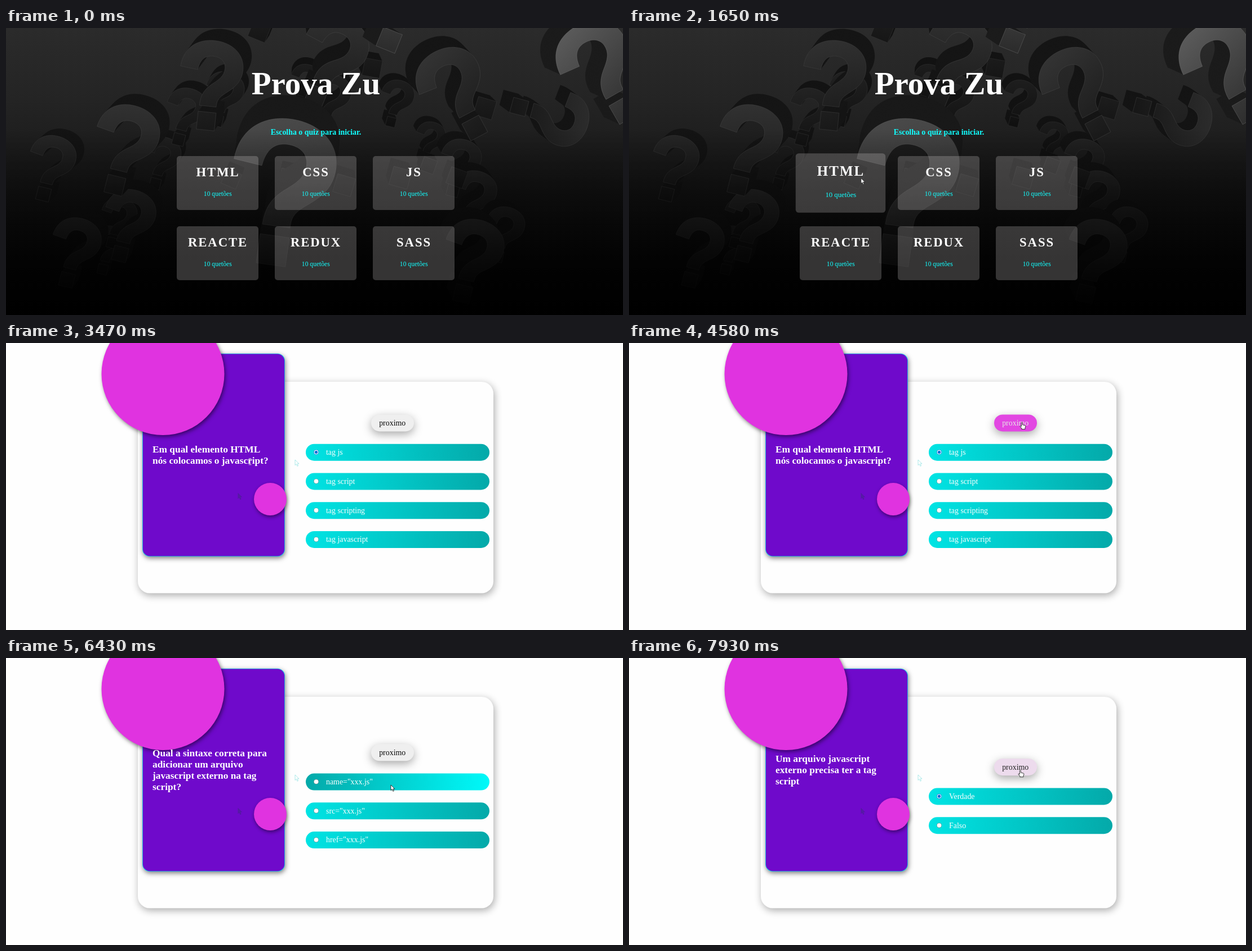
An HTML page with a canvas that plays this animation: 1095 px wide and 511 px high, repeating every 8000 ms.

```html
<!DOCTYPE html>
<html lang="pt">
<head>
<meta charset="utf-8">
<title>Quiz</title>
<style>
  html, body { margin: 0; width: 100%; height: 100%; overflow: hidden; background: #000; }
  canvas { display: block; }
</style>
</head>
<body>
<canvas id="stage" width="1095" height="511"></canvas>
<script>
const W = 1095, H = 511, LOOP = 8000, FADE = 300;
const ctx = document.getElementById('stage').getContext('2d');
const SERIF = '"Liberation Serif", "Times New Roman", serif';
const PINK = '#e033e0';
const QUIZ_START = 1710;

// start: the question appears, picked: its first answer is chosen
const questions = [
  { start: QUIZ_START, picked: 2850, lines: ['Em qual elemento HTML', 'nós colocamos o javascript?'],
    options: ['tag js', 'tag script', 'tag scripting', 'tag javascript'] },
  { start: 5040, picked: 5640, lines: ['Onde é o local certo de', 'colocar o javascript?'],
    options: ['Na tag body', 'Na tag head', 'Tanto na tag body quanto a head estão corretas'] },
  { start: 6000, picked: 6640, lines: ['Qual a sintaxe correta para', 'adicionar um arquivo', 'javascript externo na tag', 'script?'],
    options: ['name="xxx.js"', 'src="xxx.js"', 'href="xxx.js"'] },
  { start: 7120, picked: 7650, lines: ['Um arquivo javascript', 'externo precisa ter a tag', 'script'],
    options: ['Verdade', 'Falso'] },
];
const cards = ['HTML', 'CSS', 'JS', 'REACTE', 'REDUX', 'SASS'].map((name, i) =>
  ({ name, x: 303 + i % 3 * 174, y: i < 3 ? 228 : 353, w: 145, h: 96 }));

// ---- layout ----
const questionAt = t => questions.findLast(q => t >= q.start);
const optionBox = (q, i) => ({ x: 532, y: 179.7 + 25.9 * (4 - q.options.length) + 51.75 * i, w: 326, h: 30 });
const buttonBox = q => ({ x: 648, y: optionBox(q, 0).y - 52.3, w: 76, h: 30 });
const textBox = { x: 260, y: 180, w: 206, h: 40 };
const inside = (p, r) => p.x >= r.x && p.x < r.x + r.w && p.y >= r.y && p.y < r.y + r.h;

// ---- pointer: eased, slightly bowed moves between spots inside boxes ----
const spot = (r, fx, fy) => ({ x: r.x + r.w * fx, y: r.y + r.h * fy });
const answer = (n, fx, fy) => spot(optionBox(questions[n], 0), fx, fy);
const button = (n, fx = 0.5, fy = 0.6) => spot(buttonBox(questions[n]), fx, fy);
const smooth = k => k * k * (3 - 2 * k);

const moves = [
  { from: 90, to: 850, goal: spot(cards[1], 0.6, 0.6) },
  { from: 920, to: 1390, goal: spot(cards[0], 0.75, 0.41) },
  { from: 1970, to: 2380, goal: answer(0, 0.166, 0.4) },
  { from: 2520, to: 2800, goal: answer(0, 0.06, 0.45) },
  { from: 2950, to: 3260, goal: spot(textBox, 0.975, 0.78) },
  { from: 3330, to: 3470, goal: spot(textBox, 0.84, 0.78) },
  { from: 3730, to: 4580, goal: button(0, 0.65, 0.45) },
  { from: 5180, to: 5500, goal: answer(1, 0.44, 0.25) },
  { from: 5720, to: 5900, goal: button(1) },
  { from: 6010, to: 6300, goal: answer(2, 0.463, 0.68) },
  { from: 6700, to: 6950, goal: button(2) },
  { from: 7390, to: 7600, goal: answer(3, 0.485, 0.5) },
  { from: 7770, to: 7930, goal: button(3, 0.61, 0.67) },
];

function pointerAt(t) {
  const i = moves.findLastIndex(move => t >= move.from);
  if (i < 0) return { x: -99, y: -99 };
  const { from, to, goal } = moves[i];
  const origin = i ? moves[i - 1].goal : { x: 1060, y: 500 };
  const k = smooth(Math.min(1, (t - from) / (to - from)));
  const dx = goal.x - origin.x, dy = goal.y - origin.y;
  const bow = 0.09 * Math.hypot(dx, dy) * Math.sin(Math.PI * k);
  return { x: origin.x + dx * k, y: origin.y + dy * k - bow };
}

const overButton = t => t >= QUIZ_START && inside(pointerAt(t), buttonBox(questionAt(t)));

// share of the last FADE ms spent hovering, eased
function hoverAmount(isOver, t) {
  const samples = 30;
  let hits = 0;
  for (let i = 0; i < samples; i++) if (isOver(t - i * FADE / samples)) hits++;
  return smooth(hits / samples);
}

// ---- drawing helpers ----
const gray = (v, a = 1) => `rgba(${v},${v},${v},${a})`;

function text(str, x, y, size, color, { bold = false, align = 'left', spacing = 0 } = {}) {
  ctx.font = `${bold ? 'bold ' : ''}${size}px ${SERIF}`;
  ctx.textAlign = align;
  ctx.letterSpacing = spacing + 'px';
  ctx.fillStyle = color;
  ctx.fillText(str, x, y);
}

function shape(build, fill, shadow) {
  ctx.save();
  if (shadow) {
    [ctx.shadowOffsetX, ctx.shadowOffsetY, ctx.shadowBlur] = shadow;
    ctx.shadowColor = gray(0, shadow[3]);
  }
  ctx.beginPath();
  build();
  ctx.fillStyle = fill;
  ctx.fill();
  ctx.restore();
}
const box = ({ x, y, w, h }, r, fill, shadow) => shape(() => ctx.roundRect(x, y, w, h, r), fill, shadow);
const disc = (x, y, r, fill, shadow) => shape(() => ctx.arc(x, y, r, 0, 7), fill, shadow);

function gradient(c, x0, y0, x1, y1, ...colors) {
  const g = c.createLinearGradient(x0, y0, x1, y1);
  colors.forEach((color, i) => g.addColorStop(i / (colors.length - 1), color));
  return g;
}

// ---- dark backdrop of solid question marks ----
const MARK = new Path2D('M0 48C2 15 25 0 52 0C82 0 104 18 104 44C104 68 88 78 76 88C68 95 66 100 66 110L38 110' +
  'C38 92 44 82 56 72C66 64 74 57 74 45C74 33 65 26 52 26C39 26 31 34 29 51ZM37 120h30v30h-30z');
const CUBE = new Path2D('M27 50h50v50h-50z');

// sides recede towards a point above the stage; the light comes from the top right
function solid(c, path, x, y, size, tilt = 14) {
  const toX = 550 - x, toY = -150 - y, depth = size * 0.16, far = Math.hypot(toX, toY);
  const glow = 250 * (x / W - 2 * y / H - 0.5);
  const light = 10 + size / 4 + Math.max(0, Math.min(35, glow));
  const place = d => {
    c.setTransform(1, 0, 0, 1, x + d * toX / far, y + d * toY / far);
    c.rotate(tilt * Math.PI / 180);
    c.scale(size / 150, size / 150);
    c.translate(-52, -75);
  };
  c.save();
  for (let d = depth; d > 0; d -= 1.5) {
    place(d);
    c.fillStyle = gray(14 + light * 0.14);
    c.fill(path);
  }
  place(0);
  c.fillStyle = gradient(c, 0, 0, 40, 150, gray(light), gray(light * 0.75), gray(light * 0.5));
  c.fill(path);
  c.lineWidth = 110 / size;
  c.strokeStyle = gray(light + 30, 0.5);
  c.stroke(path);
  c.restore();
}

function seeded(seed) {
  return () => (seed = seed * 16807 % 2147483647) / 2147483647;
}

function makeBackdrop() {
  const layer = new OffscreenCanvas(W, H), c = layer.getContext('2d'), random = seeded(11);
  const between = (a, b) => a + (b - a) * random();
  c.fillStyle = gradient(c, 0, 0, 0, H, '#2b2b2b', '#242424', '#191919', '#0e0e0e', '#050505');
  c.fillRect(0, 0, W, H);

  // small pieces strewn along an arch, then the large marks
  for (let i = 0; i < 12; i++) {
    const a = Math.PI * (1 + i / 11);
    solid(c, MARK, 550 + 330 * Math.cos(a) + between(-40, 40), 400 + 290 * Math.sin(a) + between(-40, 40), between(75, 115));
  }
  for (let i = 0; i < 10; i++) solid(c, CUBE, 400 + 50 * i, between(0, 280), between(75, 105), between(10, 25));
  [[78, 250, 118], [120, 400, 125], [215, 352, 130], [825, 415, 150], [575, 60, 165, 22], [965, 155, 140, 105],
   [800, 118, 170, -28], [362, 102, 160, 6], [209, 217, 162], [707, -45, 180, 22], [1058, 80, 190, -30],
   [488, 292, 262, 8]].forEach(mark => solid(c, MARK, ...mark));

  c.fillStyle = gradient(c, 0, 180, 0, H, gray(0, 0), gray(0, 0.4), gray(0, 0.7), gray(0, 1));
  c.fillRect(0, 0, W, H);
  return layer;
}
const backdrop = makeBackdrop();

// ---- pointer shapes ----
const ARROW = new Path2D('M0 0V9.6L2.2 7.6L3.9 11.3L5.5 10.6L3.9 7H7Z');
const HAND = new Path2D('M-1 .9Q0-.6 1 .9V4.8L5.5 5.8Q6.8 6.3 6.5 8L5.6 10V12.5H-.6V11L-3.6 7.4Q-3.2 5.8-1 7.6Z');
const BEAM = new Path2D('M-2.5-5.5H2.5M0-5.5V5.5M-2.5 5.5H2.5');

function icon(path, { x, y }, fill, stroke) {
  ctx.save();
  ctx.translate(x, y);
  ctx.lineWidth = 0.9;
  ctx.lineJoin = 'round';
  if (fill) { ctx.fillStyle = fill; ctx.fill(path); }
  ctx.strokeStyle = stroke;
  ctx.stroke(path);
  ctx.restore();
}

function drawPointer(t) {
  const p = pointerAt(t);
  if (t >= QUIZ_START && inside(p, textBox)) icon(BEAM, p, null, '#ddd');
  else icon(overButton(t) ? HAND : ARROW, p, '#fff', '#222');
}

// ---- scenes ----
function drawHome(t) {
  ctx.drawImage(backdrop, 0, 0);
  text('Prova Zu', 550, 118, 57, '#fff', { bold: true, align: 'center' });
  text('Escolha o quiz para iniciar.', 550, 190, 13.85, '#1ff', { bold: true, align: 'center' });
  for (const card of cards) {
    const scale = 1 + 0.1 * hoverAmount(time => inside(pointerAt(time), card), t);
    ctx.save();
    ctx.translate(card.x + card.w / 2, card.y + card.h / 2);
    ctx.scale(scale, scale);
    box({ x: -card.w / 2, y: -card.h / 2, w: card.w, h: card.h }, 5, 'rgba(255,250,250,.2)');
    text(card.name, 0.5, -12.2, 22.7, '#fff', { bold: true, align: 'center', spacing: 1.9 });
    text('10 quetões', 0.3, 22.7, 11.6, '#1ff', { align: 'center' });
    ctx.restore();
  }
}

function drawRadio(x, y, checked) {
  disc(x, y, 4.5, checked ? '#0a6fd8' : '#6f8f8f');
  disc(x, y, 3.8, '#fff');
  if (checked) disc(x, y, 2.7, '#0a6fd8');
}

function drawQuiz(t) {
  const q = questionAt(t), p = pointerAt(t);
  ctx.fillStyle = '#fefefe';
  ctx.fillRect(0, 0, W, H);
  box({ x: 234, y: 69, w: 631, h: 376.5 }, 21, '#fefefe', [2, 4, 14, 0.33]);
  box({ x: 242, y: 18.7, w: 253, h: 361.6 }, 13, '#10d8f0', [1, 3, 8, 0.5]);
  box({ x: 242.8, y: 19.5, w: 251.4, h: 360 }, 12.5, '#6f0acb');
  disc(278.5, 55, 109, PINK, [2, 3, 7, 0.5]);
  disc(469, 278, 29, PINK, [1, 3, 6, 0.45]);

  q.lines.forEach((line, i) =>
    text(line, 260, 205.1 + (i - (q.lines.length - 1) / 2) * 19.75, 17.35, '#fff', { bold: true }));

  q.options.forEach((label, i) => {
    const r = optionBox(q, i);
    const colors = inside(p, r) ? ['#04a9a9', '#00f9f9'] : ['#00e4e4', '#04a9a9'];
    box(r, 15, gradient(ctx, r.x, 0, r.x + r.w, 0, ...colors));
    drawRadio(550.5, r.y + 14.7, i === 0 && t >= q.picked);
    text(label, 568, r.y + 19.3, 13.9, '#fff');
  });

  const b = buttonBox(q), k = hoverAmount(overButton, t);
  const mix = (from, to) => Math.round(from + (to - from) * k);
  box(b, 15, `rgb(${mix(239, 224)},${mix(239, 51)},${mix(239, 224)})`, [0, 5, 16, 0.34]);
  text('proximo', b.x + b.w / 2 - 0.3, b.y + 19.8, 13.9, gray(mix(12, 255)), { align: 'center' });

  // faint pointer trails
  if (t > 1970) icon(ARROW, moves[1].goal, 'rgba(50,50,110,.4)', 'rgba(50,50,110,.2)');
  if (t > 2260) icon(ARROW, { x: 513, y: 208 }, null, 'rgba(0,190,190,.35)');
}

function frame(now) {
  const t = now % LOOP;
  (t < QUIZ_START ? drawHome : drawQuiz)(t);
  drawPointer(t);
  requestAnimationFrame(frame);
}
requestAnimationFrame(frame);
</script>
</body>
</html>
```
